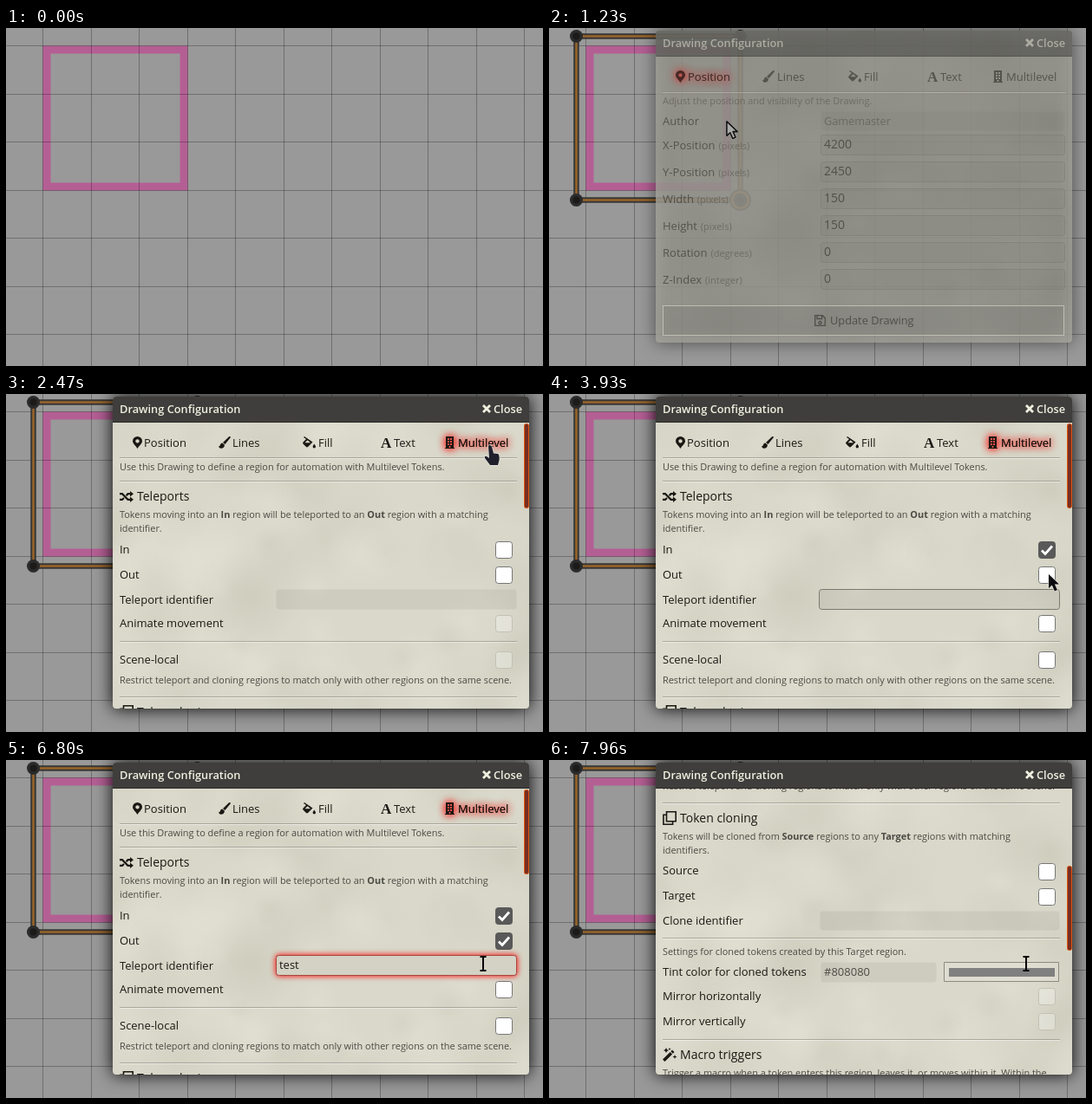
Write an HTML page with a canvas that moves like this. It is 619x390 px and loops after 8000 ms.

```html
<!DOCTYPE html>
<html lang="en">
<head>
<meta charset="utf-8">
<title>Drawing Configuration</title>
<style>
html, body { margin: 0; width: 100%; height: 100%; overflow: hidden; background: #999; }
canvas { display: block; }
</style>
</head>
<body>
<canvas id="stage" width="619" height="390"></canvas>
<script>
const W = 619, H = 390, LOOP = 8000;
const c = document.getElementById('stage').getContext('2d');
const INK = '#191813', MUTED = '#4b4a44', NAVY = '#20202c';
const WIN = { x: 123, y: 3, w: 480, h: 360, head: 30 };

const ICONS = {
  pin: 'M5.5 14C4 11 0 8 0 5.4A5.5 5.4 0 0 1 11 5.4C11 8 7 11 5.5 14ZM5.5 3.2a2.2 2.2 0 1 0 .01 0Z',
  brush: 'M14 1L7.5 9 5 7 12 .3Q13.5-.6 14 1ZM4.3 7.6L7 9.8Q6.5 14 2.5 13.8 .6 13.6 0 11.2 1.7 11.7 2 9.6 2.6 7.8 4.3 7.6Z',
  bucket: 'M2 0L11.5 6.5 6 12Q5 12.8 4 12L.5 8.6Q-.4 7.5 .5 6.5L4 3 1 1ZM2.5 7.2H9L5.6 4.2ZM13.3 8.5Q15 11 15 11.8A1.7 1.6 0 0 1 11.6 11.8Q11.6 11 13.3 8.5Z',
  building: 'M1 0H10V13H11V14H0V13H1ZM3 2h2v2h-2zM6 2h2v2h-2zM3 5h2v2h-2zM6 5h2v2h-2zM3 8h2v2h-2zM6 8h2v2h-2zM4.5 11h2v2h-2z',
  heads: 'M12 0L16 3.2 12 6.4ZM12 6.6L16 9.8 12 13Z',
  wand: 'M0 13.5L8.6 4.9 11.1 7.4 2.5 16ZM9.3 4.2L11 2.5 13.5 5 11.8 6.7ZM4 0l1 2 2 1-2 1-1 2-1-2-2-1 2-1zM14 8l.7 1.8 1.8.7-1.8.7-.7 1.8-.7-1.8-1.8-.7 1.8-.7zM8 0l.5 1 1 .5-1 .5-.5 1-.5-1-1-.5 1-.5z'
};
const LINES = {
  shuffle: 'M0 3.2H3L9.5 9.8H13M0 9.8H3L5 8M7.6 5.2L9.5 3.2H13',
  clone: 'M4.5 .8H15.2V11.8H4.5ZM4.5 4.2H.9V15.3H11.6V11.8',
  save: 'M.7 .7H9.3L12.3 3.7V12.3H.7ZM3 .7V4.5H8.6V.7M6.5 7.4a1.6 1.6 0 1 0 .01 0Z',
  close: 'M1 1L9 9M9 1L1 9',
  check: 'M1 6.5L5 10.5 13 1.5'
};
const ARROW = new Path2D('M0 0V16.2L3.8 12.6 6.9 19.4 9.9 18 6.9 11.5H12Z');
const HAND = new Path2D('M-2 0Q0-2.5 2 .8L4 8.5 9 9Q11 10 10.6 16L9 22H0L-6 14Q-7 11-4 12L-1 14Z');
const BEAM = new Path2D('M-3.5-8H-1L0-7 1-8H3.5M0-7V7M-3.5 8H-1L0 7 1 8H3.5');

function icon(name, x, y, color = INK) {
  c.save();
  c.translate(x, y);
  c.fillStyle = color;
  c.fill(new Path2D(ICONS[name]), 'evenodd');
  c.restore();
}

function lineIcon(name, x, y, width, color = INK) {
  c.save();
  c.translate(x, y);
  c.strokeStyle = color;
  c.lineWidth = width;
  c.stroke(new Path2D(LINES[name]));
  c.restore();
}

// y is the vertical middle; *stars* mark bold runs
function text(s, x, y, size = 13, color = INK, weight = 400) {
  c.fillStyle = color;
  s.split('*').forEach((run, i) => {
    c.font = `${i % 2 ? 700 : weight} ${size}px "Open Sans", "Noto Sans", sans-serif`;
    c.fillText(run, x, Math.round(y + size * 0.36));
    x += c.measureText(run).width;
  });
  return x;
}

const note = (s, y) => text(s, 131, y, 10.9, MUTED);

function label(s, y, unit) {
  const x = text(s, 131, y);
  if (unit) text(`(${unit})`, x + 4, y + 1, 11, MUTED);
}

function box(x, y, w, h, r, fill, stroke) {
  c.beginPath();
  c.roundRect(x + 0.5, y + 0.5, w - 1, h - 1, r);
  c.fillStyle = fill;
  c.fill();
  if (stroke) {
    c.strokeStyle = stroke;
    c.lineWidth = 1;
    c.stroke();
  }
}

function rule(y, right = 589) {
  c.fillStyle = 'rgba(110,108,95,.45)';
  c.fillRect(131, y, right - 131, 1);
  c.fillStyle = 'rgba(255,255,255,.5)';
  c.fillRect(131, y + 1, right - 131, 1);
}

function field(x, y, w, h, on) {
  box(x, y, w, h, 3, 'rgba(0,0,0,.055)', on && '#7a7971');
}

function checkbox(y, enabled, checked) {
  if (!enabled) return box(564, y, 20, 20, 3, 'rgba(255,255,255,.3)', '#c3c1b5');
  box(564, y, 20, 20, 3, checked ? '#595959' : '#fff', checked ? '#595959' : '#767676');
  if (checked) lineIcon('check', 567, y + 4, 2.8, '#fff');
}

// parchment with soft seeded stains
const paper = document.createElement('canvas');
paper.width = WIN.w;
paper.height = WIN.h;
{
  const p = paper.getContext('2d');
  let seed = 11;
  const rnd = () => (seed = (seed * 16807) % 2147483647) / 2147483647;
  p.fillStyle = '#d9d8ca';
  p.fillRect(0, 0, WIN.w, WIN.h);
  for (let i = 0; i < 90; i++) {
    const x = rnd() * WIN.w, y = rnd() * WIN.h, r = 15 + rnd() * 50;
    const tone = i % 2 ? '238,236,224' : '188,187,168';
    const g = p.createRadialGradient(x, y, 0, x, y, r);
    g.addColorStop(0, `rgba(${tone},.2)`);
    g.addColorStop(1, `rgba(${tone},0)`);
    p.fillStyle = g;
    p.fillRect(x - r, y - r, 2 * r, 2 * r);
  }
}

function scene(t) {
  c.fillStyle = '#999';
  c.fillRect(0, 0, W, H);
  c.strokeStyle = '#b45f94';
  c.lineWidth = 9;
  c.strokeRect(47, 25, 158, 158);
  c.fillStyle = 'rgba(0,0,0,.27)';
  for (let i = 0; i < 11; i++) c.fillRect(Math.floor(42.5 + i * 55.5), 0, 1, H);
  for (let i = 0; i < 7; i++) c.fillRect(0, Math.floor(20.5 + i * 55.5), W, 1);
  if (t >= 920) selection(t < 1310);
}

function disc(x, y, r, color) {
  c.beginPath();
  c.arc(x, y, r, 0, 7);
  c.fillStyle = color;
  c.fill();
}

function selection(hot) {
  c.strokeStyle = '#383735';
  c.lineWidth = 6.5;
  c.strokeRect(31.5, 9.5, 189, 189);
  c.strokeStyle = '#9c662a';
  c.lineWidth = 2.4;
  c.strokeRect(31.5, 9.5, 189, 189);
  for (const x of [31.5, 220.5]) for (const y of [9.5, 198.5]) {
    if (hot && x > 100 && y > 100) {
      disc(x, y, 12.5, '#33312e');
      disc(x, y, 10.5, '#a3672a');
      disc(x, y, 8, '#2c2a27');
    }
    disc(x, y, 7.5, '#2b2b2b');
    disc(x, y, 4, '#1c1b1a');
  }
}

function glow(on, draw) {
  c.save();
  if (on) {
    c.shadowColor = '#f00';
    c.shadowBlur = 10;
    draw();
  }
  draw();
  c.restore();
}

// tab columns: icon x and label x, for the wide and the scrolling layout
function tabs(multi, hover) {
  const at = multi
    ? [[146, 159], [245, 261], [342, 360], [432, 447], [506, 521]]
    : [[146, 160], [246, 263], [345, 363], [436, 451], [512, 527]];
  const names = ['Position', 'Lines', 'Fill', 'Text', 'Multilevel'];
  const marks = ['pin', 'brush', 'bucket', null, 'building'];
  names.forEach((name, i) => {
    const [ix, tx] = at[i];
    glow(i === (multi ? 4 : 0) || (i === 4 && hover), () => {
      if (marks[i]) icon(marks[i], ix, 49);
      else {
        c.font = 'bold 17px "Liberation Serif", serif';
        c.fillStyle = INK;
        c.fillText('A', ix, 62);
      }
      text(name, tx, 56);
    });
  });
  rule(73, multi ? 589 : 595);
}

function positionTab(t) {
  tabs(false, t >= 2000);
  note('Adjust the position and visibility of the Drawing.', 84);
  label('Author', 107);
  field(313, 96, 282, 23);
  text('Gamemaster', 317, 107, 12.7, MUTED);
  const rows = [['X-Position', 'pixels', 4200], ['Y-Position', 'pixels', 2450], ['Width', 'pixels', 150],
    ['Height', 'pixels', 150], ['Rotation', 'degrees', 0], ['Z-Index', 'integer', 0]];
  rows.forEach(([name, unit, value], i) => {
    const y = 135 + i * 31;
    label(name, y, unit);
    field(313, y - 12, 282, 24, true);
    text(String(value), 317, y - 1, 14);
  });
  box(131, 320, 463, 35, 0, 'rgba(0,0,0,.09)', '#eeede2');
  box(132, 321, 461, 33, 0, 'rgba(0,0,0,0)', '#8b8a80');
  lineIcon('save', 306, 331, 1.3);
  text('Update Drawing', 324, 337, 12.8);
}

const KEYS = [5710, 5860, 6090, 6260];

function identifier(t, enabled) {
  const focus = t >= 4780;
  if (focus) {
    c.save();
    c.shadowColor = '#f00';
    c.shadowBlur = 6;
    box(311, 225, 278, 24, 3, '#d3d2c4', '#c8423a');
    c.restore();
  }
  if (focus) box(311, 225, 278, 24, 3, '#d3d2c4', '#a8463e');
  else field(311, 225, 278, 24, enabled);
  if (!focus) return;
  const n = KEYS.filter(k => t >= k).length;
  const end = text('test'.slice(0, n), 315, 236);
  const since = Math.max(0, t - (n ? KEYS[n - 1] : 4795));
  if (Math.floor(since / 535) % 2 === 0) {
    c.fillStyle = INK;
    c.fillRect(Math.round(end), 228, 1, 17);
  }
}

function multilevelTab(t) {
  const on = t >= 3620;
  tabs(true);
  note('Use this Drawing to define a region for automation with Multilevel Tokens.', 84);
  rule(100);
  lineIcon('shuffle', 131, 112, 2.2);
  icon('heads', 131, 112);
  text('Teleports', 151, 118, 14);
  note('Tokens moving into an *In* region will be teleported to an *Out* region with a matching', 139);
  note('identifier.', 155);
  label('In', 179);
  checkbox(170, true, on);
  label('Out', 208);
  checkbox(199, true, t >= 4330);
  label('Teleport identifier', 237);
  identifier(t, on);
  label('Animate movement', 264);
  checkbox(255, on);
  rule(285);
  label('Scene-local', 306);
  checkbox(297, on);
  note('Restrict teleport and cloning regions to match only with other regions on the same scene.', 330);
  rule(349);
  lineIcon('clone', 131, 359, 1.6);
  text('Token cloning', 151, 367, 14);
  note('Tokens will be cloned from *Source* regions to any *Target* regions with matching', 388);
  note('identifiers.', 404);
  label('Source', 427);
  checkbox(419, true);
  label('Target', 456);
  checkbox(448, true);
  label('Clone identifier', 485);
  field(312, 474, 277, 23);
  rule(505);
  note('Settings for cloned tokens created by this Target region.', 521);
  label('Tint color for cloned tokens', 544);
  field(313, 533, 134, 24);
  text('#808080', 317, 544, 13, MUTED);
  box(455, 533, 133, 23, 0, 'rgba(255,255,255,.12)', '#8b8a80');
  c.fillStyle = '#808080';
  c.fillRect(461, 540, 122, 10);
  label('Mirror horizontally', 572);
  checkbox(563, false);
  label('Mirror vertically', 601);
  checkbox(592, false);
  rule(622);
  icon('wand', 131, 632);
  text('Macro triggers', 151, 640, 14);
  note('Trigger a macro when a token enters this region, leaves it, or moves within it. Within the', 661);
}

function scrollAt(t) {
  if (t >= 7960) return 300;
  if (t >= 7880) return 250;
  return t >= 7500 ? 200 : t >= 7100 ? 100 : 0;
}

function dialog(t) {
  const { x, y, w, h, head } = WIN;
  c.save();
  c.globalAlpha = Math.min(1, (t - 1155) / 150);
  c.save();
  c.shadowColor = '#000';
  c.shadowBlur = 20;
  c.fillStyle = '#444';
  c.beginPath();
  c.roundRect(x, y, w, h, 4);
  c.fill();
  c.restore();

  c.save();
  c.beginPath();
  c.roundRect(x, y, w, h, 4);
  c.clip();
  c.drawImage(paper, x, y);
  c.fillStyle = '#3f3e3c';
  c.fillRect(x, y, w, head);
  c.fillStyle = 'rgba(0,0,0,.35)';
  c.fillRect(x, y + head - 1, w, 1);
  c.restore();
  text('Drawing Configuration', 131, 17, 12.8, '#f0f0e0', 600);
  lineIcon('close', 549, 12, 2.8, '#f0f0e0');
  text('Close', 562, 17, 12.8, '#f0f0e0', 600);

  c.beginPath();
  c.rect(x, y + head, w, h - head);
  c.clip();
  if (t < 2320) positionTab(t);
  else {
    const top = scrollAt(t);
    c.save();
    c.translate(0, -top);
    multilevelTab(t);
    c.restore();
    box(597, Math.round(34 + top * 0.293), 6, 98, 2, '#782e22', '#e0560c');
  }
  c.restore();
}

// time, x, y and how the pointer arrives there
const PATH = [
  [70, 519, 380], [840, 206, 108, 'both'], [1310, 205, 108, 'both'],
  [1690, 442, 95, 'in'], [2000, 558, 60, 'out'], [2720, 558, 60, 'both'],
  [3100, 571, 191, 'both'], [3180, 571, 191, 'both'], [3410, 572, 182, 'both'],
  [3620, 572, 182, 'both'], [3930, 576, 208, 'both'], [4330, 576, 208, 'both'],
  [4550, 550, 235, 'both']
];
const EASE = {
  in: u => u ** 1.6,
  out: u => 1 - (1 - u) ** 2,
  both: u => u * u * (3 - 2 * u)
};

function pointerAt(t) {
  const i = PATH.findIndex(p => p[0] > t);
  if (i < 0) return PATH[PATH.length - 1].slice(1, 3);
  if (i === 0) return PATH[0].slice(1, 3);
  const [t0, x0, y0] = PATH[i - 1], [t1, x1, y1, ease] = PATH[i];
  const k = EASE[ease]((t - t0) / (t1 - t0));
  return [x0 + (x1 - x0) * k, y0 + (y1 - y0) * k];
}

const CLICKS = [[1000, 1230], [2320, 2395], [3620, 3695], [4330, 4405], [4780, 4850]];

function pointer(t) {
  if (t < 70) return;
  // the pointer is refreshed about 13 times a second
  const tick = Math.max(70, Math.floor((t + 12) / 77.3) * 77.3);
  const [x, y] = pointerAt(tick).map(Math.round);
  c.save();
  c.translate(x, y);
  c.lineJoin = 'round';
  if (t >= 4545) {
    c.strokeStyle = '#000';
    c.lineWidth = 2;
    c.stroke(BEAM);
  } else {
    const shape = t >= 2170 && t < 2865 ? HAND : ARROW;
    const canvasMode = t < 1310;
    c.lineWidth = canvasMode ? 1.3 : 1.4;
    c.strokeStyle = canvasMode ? '#111' : 'rgba(235,235,230,.8)';
    c.fillStyle = canvasMode ? '#a9a9a9' : t < 2790 ? NAVY : '#0c0c10';
    c.stroke(shape);
    c.fill(shape);
    if (canvasMode) c.stroke(shape);
  }
  c.restore();
  if (CLICKS.some(([a, b]) => t >= a && t < b)) disc(x, y, 12, 'rgba(245,236,22,.6)');
}

function draw(t) {
  scene(t);
  if (t > 1155) dialog(t);
  pointer(t);
}

const start = performance.now();
function frame() {
  draw((performance.now() - start) % LOOP);
  requestAnimationFrame(frame);
}
frame();
</script>
</body>
</html>
```
